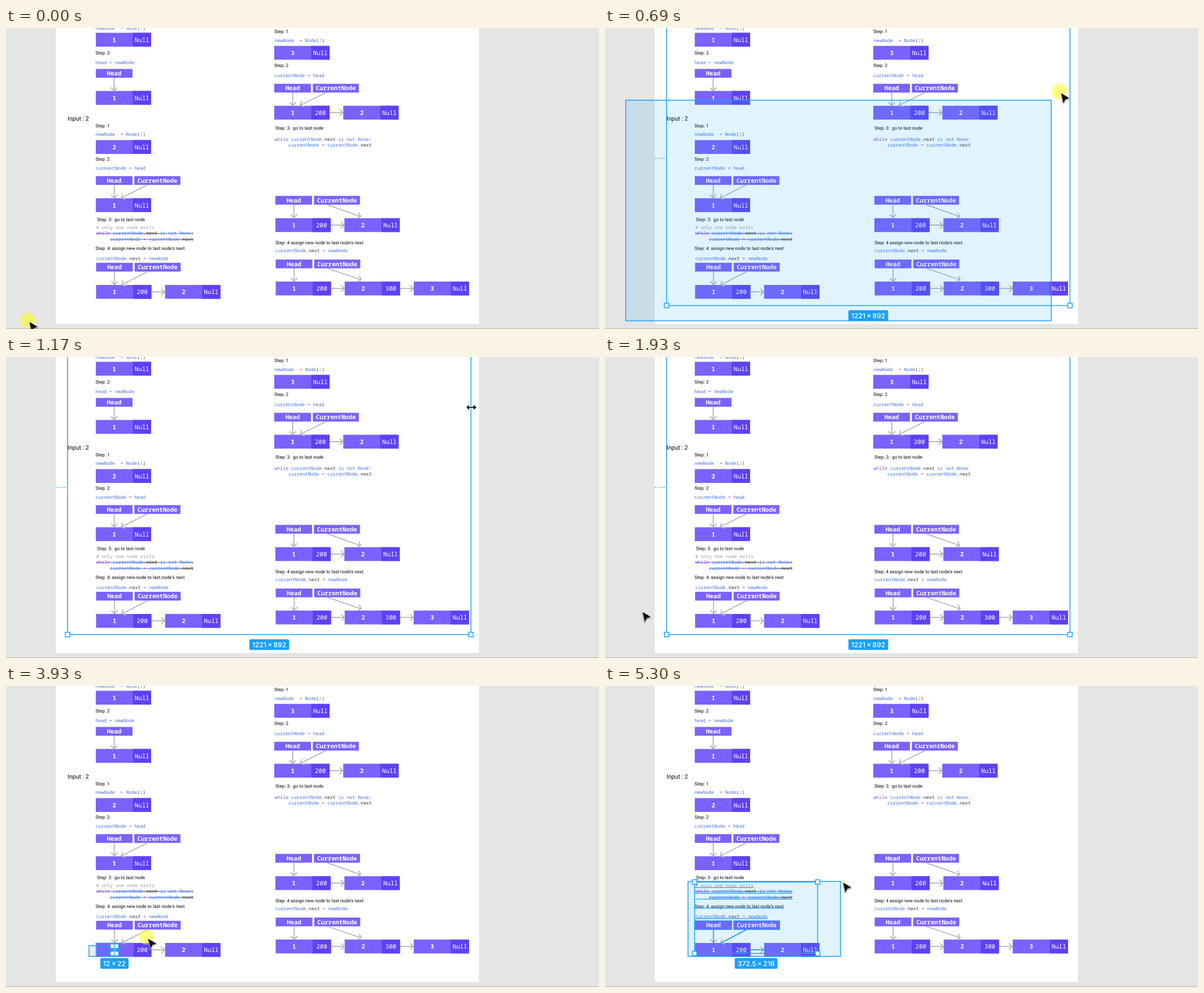
Write an HTML page with a canvas that moves like this. It is 1050x533 px and loops after 5.37 s.

```html
<!DOCTYPE html>
<html lang="en">
<head>
<meta charset="utf-8">
<title>Linked list insertion</title>
<style>
html, body { margin: 0; width: 100%; height: 100%; overflow: hidden; background: #e5e5e5; }
canvas { display: block; }
</style>
</head>
<body>
<canvas id="stage" width="1050" height="533"></canvas>
<script>
const LOOP = 5370, ZOOM = 0.585;
const BLUE = '#18a0fb', VIOLET = '#7b61ff', DEEP = '#5f41f5', GREY = '#b3b3b3';
const MONO = '"Noto Sans Mono", "DejaVu Sans Mono", monospace';
const CODE_SIZE = 8.2, CODE_STEP = CODE_SIZE * 0.6;
const stage = document.getElementById('stage');
let ctx = stage.getContext('2d');

function text(str, x, y, font, color, align = 'left') {
  ctx.font = font;
  ctx.fillStyle = color;
  ctx.textAlign = align;
  ctx.textRendering = 'geometricPrecision';
  ctx.fillText(str, x, y);
}

function rect(x, y, w, h, color) {
  ctx.fillStyle = color;
  ctx.fillRect(x, y, w, h);
}

function line(x1, y1, x2, y2, color, width) {
  ctx.strokeStyle = color;
  ctx.lineWidth = width;
  ctx.beginPath();
  ctx.moveTo(x1, y1);
  ctx.lineTo(x2, y2);
  ctx.stroke();
}

const label = (str, x, mid) => text(str, x, mid + 2.9, '8.19px Roboto, sans-serif', '#000');

function tokenColor(tok) {
  if (tok[0] === '#') return '#999';
  if (tok === 'while') return '#8250df';
  if (tok === '=') return '#9747ff';
  if (/^\d/.test(tok)) return '#b3a595';
  return /^[.():]/.test(tok) ? '#333' : '#3f6fd9';
}

function code(str, x, mid, struck) {
  for (const m of str.matchAll(/#.*|\.next|\w+|[=().:]/g)) {
    const tx = x + m.index * CODE_STEP, color = tokenColor(m[0]);
    text(m[0], tx, mid + 2.7, `500 ${CODE_SIZE}px ${MONO}`, color);
    if (struck) {
      const space = str[m.index + m[0].length] === ' ' ? 1 : 0;
      rect(tx, mid, (m[0].length + space) * CODE_STEP, 1, color);
    }
  }
}

function node(x, y, value, next) {
  rect(x, y, 98, 24.5, VIOLET);
  rect(x + 65.5, y, 32.5, 24.5, DEEP);
  text(value, x + 32.7, y + 16, `bold 10.7px ${MONO}`, '#fff', 'center');
  text(next, x + 81.7, y + 16, `10.7px ${MONO}`, '#fff', 'center');
}

function tag(name, x, y) {
  const w = name === 'Head' ? 65 : 81.5;
  rect(x, y, w, 15.5, VIOLET);
  text(name, x + w / 2, y + 11.5, `bold 10.7px ${MONO}`, '#fff', 'center');
}

function arrow(x1, y1, x2, y2) {
  line(x1, y1, x2, y2, GREY, 1.8);
  const a = Math.atan2(y2 - y1, x2 - x1);
  for (const turn of [2.36, -2.36])
    line(x2, y2, x2 + 8 * Math.cos(a + turn), y2 + 8 * Math.sin(a + turn), GREY, 1.8);
}

// Both pointer tags over a row; the second points at (tx, ty)
function pointers(x, y, tx, ty) {
  tag('Head', x, y);
  tag('CurrentNode', x + 68.3, y);
  arrow(x + 32.7, y + 15.5, x + 32.7, y + 38.5);
  arrow(x + 91.5, y + 15.5, tx, ty);
}

function chain(x, y, ...cells) {
  for (let i = 0; i < cells.length; i += 2) {
    const nx = x + i * 61.1;
    node(nx, y, cells[i], cells[i + 1]);
    if (i + 2 < cells.length) arrow(nx + 98, y + 12.2, nx + 121.5, y + 12.2);
  }
}

function drawBoard() {
  rect(0, 0, 1050, 533, '#e5e5e5');
  rect(88, 0, 749.5, 524, '#fff');
  rect(0, 532, 1050, 1, '#b4b4b4');

  code('newNode  = Node(1)', 158.5, 0);
  chain(159, 8.5, '1', 'Null');
  label('Step: 2', 158.5, 44.5);
  code('head = newNode', 158.5, 61.7);
  tag('Head', 159, 72.5);
  arrow(191.5, 88, 191.5, 111);
  chain(159, 111.5, '1', 'Null');

  text('Input : 2', 109, 163.6, '10.6px Roboto, sans-serif', '#000');
  label('Step: 1', 158.5, 173);
  code('newNode  = Node(2)', 158.5, 188.7);
  chain(159, 198.5, '2', 'Null');
  label('Step: 2', 158.5, 232.5);
  code('currentNode = head', 158.5, 248.5);
  chain(159, 301.5, '1', 'Null');
  pointers(159, 262.3, 204, 301);
  label('Step: 3:  go to last node', 161, 339.3);
  code('# only one node exits', 159.7, 353);
  code('while currentNode.next is not None:', 159.7, 363.3, true);
  code('     currentNode = currentNode.next', 159.7, 373.8, true);
  label("Step: 4: assign new node to last node's next", 158.5, 389.7);
  code('currentNode.next = newNode', 159.7, 408.2);
  chain(159.5, 455, '1', '200', '2', 'Null');
  pointers(159.5, 415.8, 205, 455);

  label('Step: 1', 475, 6);
  code('newNode  = Node(2)', 475.5, 22);
  chain(475, 31.7, '3', 'Null');
  label('Step: 2', 475, 66);
  code('currentNode = head', 475, 84);
  chain(475, 137.7, '1', '200', '2', 'Null');
  pointers(475, 98.8, 521, 137);
  label('Step: 3:  go to last node', 477, 177);
  code('while currentNode.next is not None:', 475.5, 197);
  code('     currentNode = currentNode.next', 475.5, 207.7);
  chain(477, 336.8, '1', '200', '2', 'Null');
  pointers(477, 297.3, 628, 334);
  label("Step: 4 assign new node to last node's next", 477, 380);
  code('currentNode.next = newNode', 477, 394.2);
  chain(477.5, 449, '1', '200', '2', '300', '3', 'Null');
  pointers(477.5, 410, 629, 446);
}

// Selectable layers: kind, left, top, right, bottom
const layers = [
  ['text', 158.6, 347.2, 263, 358],
  ['text', 159.7, 358, 332, 368.3],
  ['text', 159.7, 368.3, 332, 378.5],
  ['text', 158.6, 384.5, 317, 394.5],
  ['text', 159.7, 403, 288, 413],
  ['box', 159.5, 415.8, 224.5, 431.3],
  ['box', 227.8, 415.8, 309.3, 431.3],
  ['line', 192.2, 431.3, 192.2, 454.3],
  ['rise', 205, 431.3, 251, 455],
  ['line', 257.5, 467.2, 281.5, 467.2],
  ['text', 188.5, 460.7, 195.52, 473.57],
  ['text', 231, 460.7, 251, 473.57],
  ['text', 310.5, 460.7, 317.5, 473.57],
  ['text', 350, 460.7, 376.5, 473.57]
];

// Pointer path: time, x, y
const path = [
  [0, 37, 518.5], [70, 40, 517], [200, 150, 462], [350, 400, 335], [480, 620, 220],
  [620, 790, 128], [690, 803, 113.5], [830, 819, 96], [970, 823, 89], [1170, 823, 89],
  [1240, 785, 113], [1450, 540, 270], [1660, 265, 413], [1730, 150, 436],
  [1800, 85, 447], [1930, 62, 449.5], [2110, 62, 449.5], [2300, 32, 455],
  [2480, 32, 455], [2610, 52, 462], [2680, 88, 468], [3030, 129, 474.5],
  [3300, 145, 479], [3780, 147, 479], [3860, 199, 460], [3930, 247, 445.5],
  [4330, 350, 400], [4600, 402, 364], [4810, 416, 349.5], [5010, 417, 346], [LOOP, 417, 346]
];

function pointerAt(t) {
  const i = Math.max(1, path.findIndex(p => p[0] >= t));
  const [t0, x0, y0] = path[i - 1], [t1, x1, y1] = path[i];
  const k = Math.max(0, (t - t0) / (t1 - t0));
  return [x0 + (x1 - x0) * k, y0 + (y1 - y0) * k];
}

function outline(x1, y1, x2, y2, width) {
  ctx.strokeStyle = BLUE;
  ctx.lineWidth = width;
  ctx.strokeRect(x1, y1, x2 - x1, y2 - y1);
}

function selection(x1, y1, x2, y2, size) {
  outline(x1, y1, x2, y2, 1.5);
  for (const x of [x1, x2]) for (const y of [y1, y2]) {
    rect(x - 4, y - 4, 8, 8, '#fff');
    outline(x - 4, y - 4, x + 4, y + 4, 1.5);
  }
  const mid = (x1 + x2) / 2, top = y2 + 8.3;
  ctx.font = '500 12.2px Inter, sans-serif';
  const w = ctx.measureText(size).width + 10;
  ctx.fillStyle = BLUE;
  ctx.beginPath();
  ctx.roundRect(mid - w / 2, top, w, 19, 2.5);
  ctx.fill();
  text(size, mid, top + 14, ctx.font, '#fff', 'center');
}

const sizeText = (w, h) => `${w}\u2009×\u2009${h}`;
const units = px => Math.round(px / ZOOM * 2) / 2;

function marquee(x, y, [cx, cy]) {
  rect(x, cy, cx - x, y - cy, 'rgba(24,160,251,.13)');
  outline(x, cy, cx, y, 1.5);
}

function selectLayers(x, y, [cx, cy]) {
  const hit = layers.filter(([, l, t, r, b]) => l < cx && r > x && t < y && b > cy);
  if (!hit.length) return;
  for (const [kind, l, t, r, b] of hit) {
    if (kind === 'box') outline(l, t, r, b, 1.2);
    else if (kind === 'text') line(l, b - 1.2, r, b - 1.2, BLUE, 1.2);
    else if (kind === 'rise') line(l, b, r, t, BLUE, 1.6);
    else line(l, t, r, b, BLUE, 1.6);
  }
  if (hit.length === 1) {
    ctx.setLineDash([2, 1.5]);
    outline(159, 455, 225.5, 479, 1.2);
    ctx.setLineDash([]);
  }
  const edge = (i, pick) => pick(...hit.map(h => h[i]));
  const l = edge(1, Math.min), t = edge(2, Math.min), r = edge(3, Math.max), b = edge(4, Math.max);
  selection(l, t, r, b, sizeText(units(r - l), units(b - t)));
}

function shape(points, fill, stroke, width) {
  ctx.beginPath();
  points.forEach(([x, y]) => ctx.lineTo(x, y));
  ctx.closePath();
  ctx.lineJoin = 'round';
  ctx.strokeStyle = stroke;
  ctx.lineWidth = width;
  ctx.stroke();
  ctx.fillStyle = fill;
  ctx.fill();
  ctx.lineJoin = 'miter';
}

function cursor([x, y], pressed, resizing) {
  if (pressed) {
    ctx.fillStyle = 'rgba(255,255,0,.5)';
    ctx.beginPath();
    ctx.arc(x + 1.5, y - 1, 13.5, 0, 7);
    ctx.fill();
  }
  ctx.save();
  if (resizing) {
    ctx.translate(x + 1.5, y);
    const half = [[-9, 0], [-4, -4.5], [-4, -1], [4, -1], [4, -4.5], [9, 0]];
    shape([...half, ...half.slice(1, 5).reverse().map(([a, b]) => [a, -b])], '#111', '#fff', 2);
  } else {
    ctx.translate(x + 4.5, y + 2);
    const arrowShape = [[0, 0], [14.5, 8.5], [7.5, 11], [4, 18]];
    ctx.shadowColor = 'rgba(0,0,0,.35)';
    ctx.shadowBlur = 2;
    ctx.shadowOffsetY = 1;
    shape(arrowShape, '#111', '#fff', 2.2);
  }
  ctx.restore();
}

const board = document.createElement('canvas');
board.width = 1050;
board.height = 533;

function paintBoard() {
  const screen = ctx;
  ctx = board.getContext('2d');
  drawBoard();
  ctx = screen;
}

function draw(t) {
  const within = (a, b) => t >= a && t < b;
  const corner = pointerAt(t - 70);  // the rubber band trails the pointer
  ctx.drawImage(board, 0, 0);

  if (within(70, 1170)) marquee(36.7, 518.5, corner);
  if (t < 2300 && (t >= 1170 || corner[0] > 109)) {
    ctx.setLineDash([3, 2]);
    line(88, 231, 108, 231, BLUE, 1);
    ctx.setLineDash([]);
    selection(109, -30.3, 823.3, 491.5, sizeText(1221, 892));
  }

  if (within(2680, 3570)) outline(87.3, -5, 838.2, 524.5, 2.5);
  if (within(3570, 3840)) selection(88, -30, 837.5, 524, sizeText(1281, 1140));
  if (t >= 3780) {
    marquee(147, 478.7, corner);
    selectLayers(147, 478.7, corner);
  }

  const pressed = t < 1170 || within(2300, 2480) || within(3570, 5300);
  cursor(pointerAt(t), pressed, within(1170, 1240));
}

paintBoard();
const start = performance.now();
(function tick() {
  draw((performance.now() - start) % LOOP);
  requestAnimationFrame(tick);
})();
</script>
</body>
</html>
```
